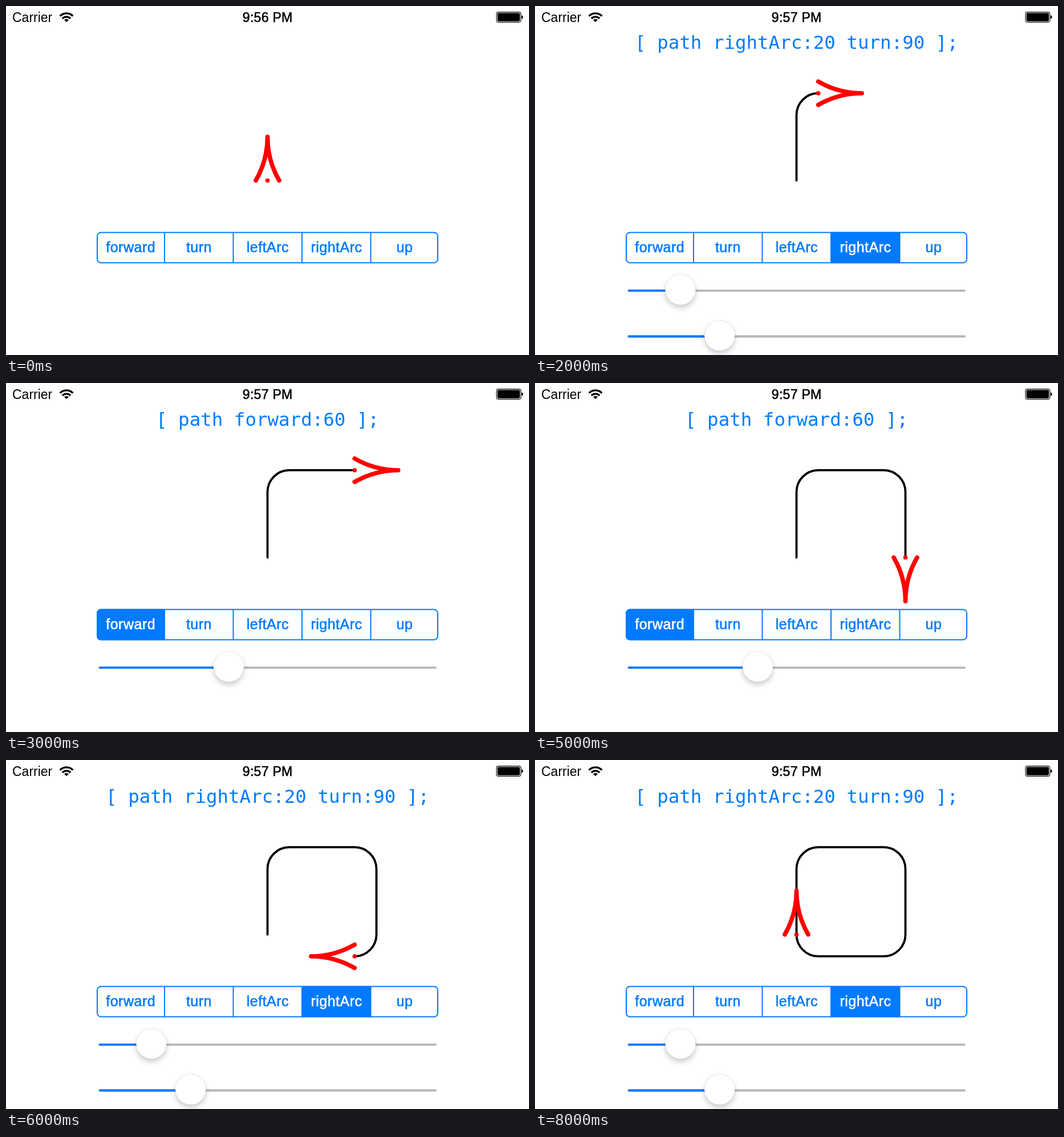
An HTML page that plays this animation: 917 px wide and 611 px high, repeating every 9 s.

```html
<!DOCTYPE html>
<html lang="en">
<head>
<meta charset="utf-8">
<title>Turtle path</title>
<style>
  html, body { margin: 0; width: 100%; height: 100%; overflow: hidden; background: #fff; }
  svg { display: block; width: 917px; height: 611px; }
  text { font-family: "Liberation Sans", Arial, sans-serif; }
  .status { font-size: 23px; }
  .mid { text-anchor: middle; }
  .medium { stroke: currentColor; stroke-width: .6; fill: currentColor; }
  .tab { font-size: 25px; letter-spacing: .5px; color: #007aff; }
  .tab.on { color: #fff; }
  .code { font: 32.47px "DejaVu Sans Mono", monospace; fill: #007aff; white-space: pre; }
  .line { fill: none; stroke-linecap: round; stroke-linejoin: round; }
  .knob { fill: #fff; filter: drop-shadow(0 0 .7px rgba(0,0,0,.4)) drop-shadow(0 5px 5px rgba(0,0,0,.2)); }
</style>
</head>
<body>
<svg viewBox="0 0 917 611">
  <clipPath id="bar"><rect x="159" y="395.5" width="599" height="55" rx="7.5"/></clipPath>
  <text class="status" x="11" y="28">Carrier</text>
  <g fill="none" stroke="#000" stroke-width="3.3">
    <path d="M94.6 17.7a15.7 15.7 0 0 1 22.8 0M98.9 22a9.8 9.8 0 0 1 14.2 0"/>
    <path d="M106 28.3l-3.9-4a5.5 5.5 0 0 1 7.8 0z" fill="#000" stroke="none"/>
  </g>
  <text id="clock" class="status mid medium" x="458.7" y="28" letter-spacing=".3"></text>
  <rect x="860" y="10.6" width="42.8" height="17.8" rx="3.5" fill="none" stroke="#000" stroke-width="1.1"/>
  <rect x="861.7" y="12.3" width="39.4" height="14.4" rx="2"/>
  <path d="M904 16.3q2.7 .8 2.7 3.2t-2.7 3.2z"/>
  <text id="code" class="code mid" x="458.5" y="74.5"></text>
  <g transform="translate(458.5 305.5) scale(1.91)">
    <path id="trail" class="line" stroke="#000" stroke-width="2"/>
    <g id="turtle" stroke="red" stroke-width="4">
      <path class="line" d="M-10.72 0A80 80 0 0 0 0-40A80 80 0 0 0 10.72 0"/>
      <circle r="2" fill="red" stroke="none"/>
    </g>
  </g>
  <g id="tabs"></g>
  <g id="sliders"></g>
</svg>
<script>
const $ = id => document.getElementById(id);
const BLUE = '#007aff';
const names = ['forward', 'turn', 'leftArc', 'rightArc', 'up'];
const edges = [159, 278, 398.5, 519, 639.5, 758];
const STEPS = 9, FORWARD = 60, RADIUS = 20;

function drawTabs(active) {
  let fill = '', lines = '', labels = '';
  names.forEach((name, i) => {
    const x = edges[i], end = edges[i + 1], on = i === active;
    if (on) fill = `<rect x="${x}" y="395.5" width="${end - x}" height="55" fill="${BLUE}" clip-path="url(#bar)"/>`;
    if (i) lines += `M${x} 396.5v53`;
    labels += `<text class="tab mid medium${on ? ' on' : ''}" x="${(x + end) / 2 + .2}" y="431">${name}</text>`;
  });
  $('tabs').innerHTML = fill +
    `<g fill="none" stroke="${BLUE}" stroke-width="2"><rect x="160" y="396.5" width="597" height="53" rx="6.5"/><path d="${lines}"/></g>` +
    labels;
}

function slider(x, y) {
  const track = (from, to, color) =>
    `<path class="line" d="M${from} ${y}H${to}" stroke="${color}" stroke-width="3.8"/>`;
  return track(164.5, 753, '#b6b6b6') + track(164.5, x, BLUE) +
    `<circle class="knob" cx="${x}" cy="${y - 1.7}" r="26.7"/>`;
}

// Odd steps go forward, even steps make a quarter turn to the right.
function drawPath(step) {
  let x = 0, y = 0, dx = 0, dy = -1, d = 'M0 0';
  for (let i = 1; i <= step; i++) {
    if (i % 2) {
      x += dx * FORWARD;
      y += dy * FORWARD;
      d += `L${x} ${y}`;
    } else {
      x += (dx - dy) * RADIUS;
      y += (dy + dx) * RADIUS;
      [dx, dy] = [-dy, dx];
      d += `A${RADIUS} ${RADIUS} 0 0 1 ${x} ${y}`;
    }
  }
  $('trail').setAttribute('d', step ? d : '');
  $('turtle').setAttribute('transform', `translate(${x} ${y}) rotate(${Math.floor(step / 2) * 90})`);
}

function draw(step) {
  const forward = step % 2 === 1;
  $('clock').textContent = step ? '9:57 PM' : '9:56 PM';
  $('code').textContent = !step ? '' : forward ? '[ path forward:60 ];' : '[ path rightArc:20 turn:90 ];';
  $('sliders').innerHTML = !step ? '' : forward ? slider(390.5, 498.3) : slider(255, 498.3) + slider(323.7, 578.5);
  drawTabs(!step ? -1 : forward ? 0 : 3);
  drawPath(step);
}

let shown = -1;
function tick() {
  const step = Math.floor(performance.now() / 1000) % STEPS;
  if (step !== shown) draw(shown = step);
  requestAnimationFrame(tick);
}
tick();
</script>
</body>
</html>
```
